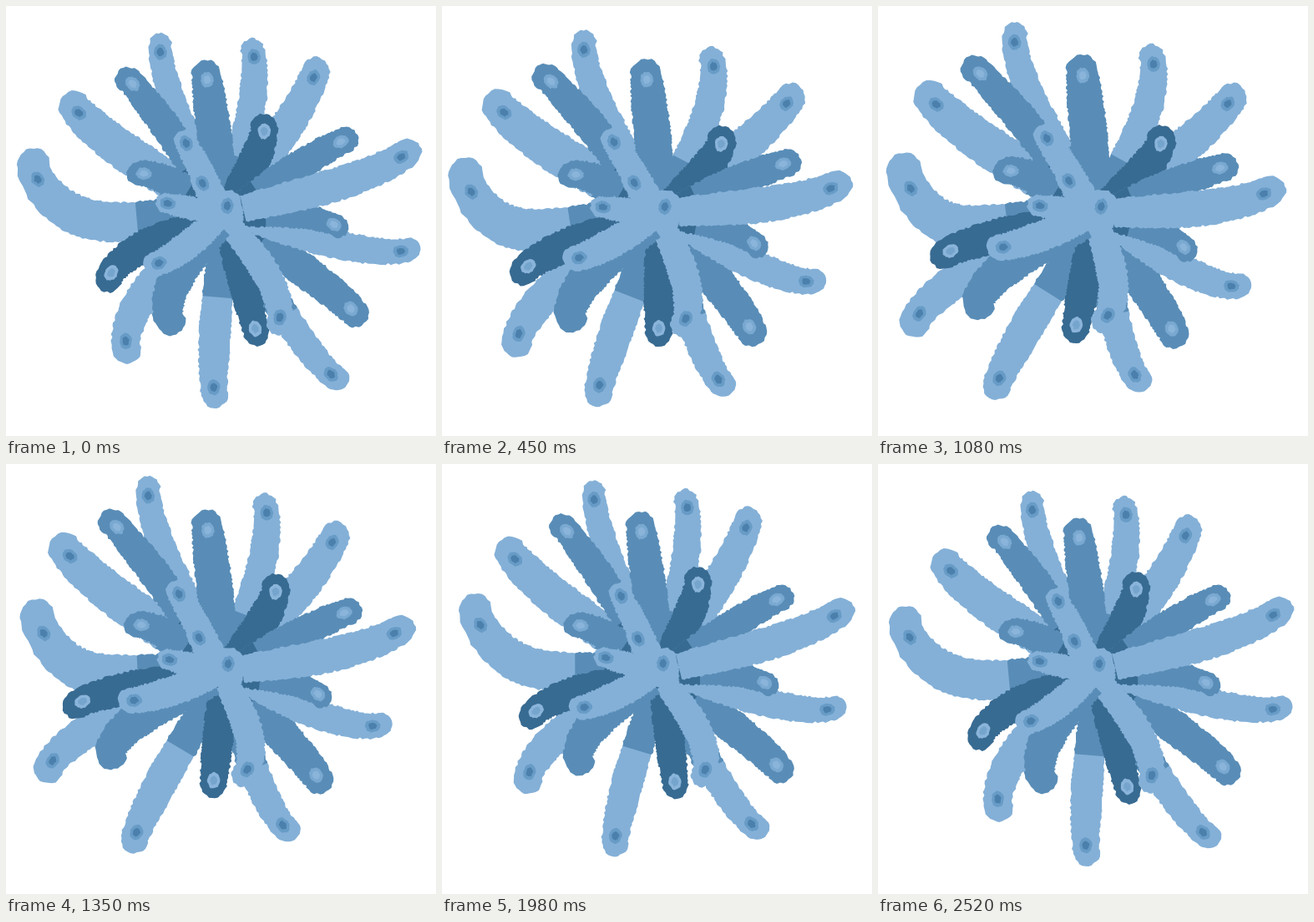
These frames come from a looping animation (515x515 px, 2550 ms). An HTML page with a canvas:

```html
<!DOCTYPE html>
<html lang="en">
<head>
<meta charset="utf-8">
<title>Anemone</title>
<style>
html, body { margin: 0; width: 100%; height: 100%; overflow: hidden; background: #fff; }
canvas { display: block; width: 515px; height: 515px; }
</style>
</head>
<body>
<canvas id="stage" width="515" height="515"></canvas>
<script>
const ctx = document.getElementById('stage').getContext('2d');
const LOOP = 2550, STEP = 30, CYCLE = 2520, SAMPLES = 70;
const CX = 262, CY = 250;
const LIGHT = { fill: '#84b0d7', shade: '#598db7', eye: '#689cc7', core: '#4b80ac' };
const MID = { fill: '#598db7', shade: '#386b92', eye: '#79a8d0', core: '#8ab4da' };
const DARK = { fill: '#386b92', shade: '#386b92', eye: '#8ab4da', core: '#75a4cc' };

// Smooth closed curve through evenly spaced keys; pos runs from 0 to 1.
function loop(keys, pos) {
  const n = keys.length, f = (pos - Math.floor(pos)) * n;
  const i = Math.floor(f), s = f - i;
  const [a, b, c, d] = [-1, 0, 1, 2].map(k => keys[(i + k + n) % n]);
  return b + .5 * s * (c - a + s * (2 * a - 5 * b + 4 * c - d + s * (3 * (b - c) + d - a)));
}

// Two poses, each a push by direction from the centre (every 30 degrees, from the right, clockwise).
const swing = {
  x: [-.2, -.37, -.42, -.48, -.49, -.27, -.02, -.08, -.17, .12, .37, .05],
  y: [.28, .22, .02, -.02, -.07, -.11, .12, 0, -.03, .02, .24, .26],
};
const lift = {
  x: [-.08, -.12, -.16, -.32, -.37, -.17, .05, 0, -.03, -.01, -.01, 0],
  y: [.02, .01, -.07, -.07, -.24, -.25, -.1, -.1, -.1, -.06, -.06, .02],
};
const swingAt = (x, time) => loop([0, .59, 1, .63 - .0005 * x, 0, -.04], time);
const liftAt = time => loop([0, -.04, .03, .67, 1, .5], time);

function warp(x, y, time) {
  const dx = x - CX, dy = y - CY, dist = Math.hypot(dx, dy);
  const dir = Math.atan2(dy, dx) / (2 * Math.PI);
  const p = swingAt(x, time) * dist, r = liftAt(time) * dist;
  return {
    x: x + p * loop(swing.x, dir) + r * loop(lift.x, dir),
    y: y + p * loop(swing.y, dir) + r * loop(lift.y, dir),
  };
}

// Fixed ragged edge, within 1.2 px.
function rough(i, seed) {
  const v = Math.sin(i * 12.9898 + seed * 78.233) * 43758.5453;
  return (v - Math.floor(v) - .5) * 2.4;
}

const polar = (c, angle, r) => [c.x + Math.cos(angle) * r, c.y + Math.sin(angle) * r];

function polygon(points, fill) {
  ctx.beginPath();
  points.forEach(p => ctx.lineTo(...p));
  ctx.fillStyle = fill;
  ctx.fill();
}

const limbs = [];
// A limb runs from its tip to near the centre, bowed sideways by bend.
function limb(tone, x, y, width, bend = 0, opts = {}) {
  const root = { x: CX + .1 * (x - CX), y: CY + .1 * (y - CY) };
  limbs.push({ tone, x, y, width, bend, root, shade: 1, ...opts });
}
const back = (tone, x, y, width, bend, shade = .72) => limb(tone, x, y, width, bend, { shade });

back(LIGHT, 185, 46, 16, 10);
back(LIGHT, 295, 53, 17, -10);
back(LIGHT, 371, 78, 20, -6);
back(LIGHT, 33, 190, 24, 46, .64);
back(LIGHT, 82, 121, 23, 8);
back(MID, 146, 88, 18, -4);
limb(MID, 240, 82, 21);
limb(DARK, 309, 145, 19, -6);
back(MID, 407, 160, 18, 3, .8);
back(LIGHT, 397, 447, 17, -9, .45);
back(MID, 418, 368, 20, 4, .8);
limb(LIGHT, 482, 292, 17, -10);
back(MID, 398, 265, 15, 8);
limb(LIGHT, 481, 175, 20, -9);
back(LIGHT, 250, 465, 19, -4, .6);
limb(DARK, 300, 392, 18);
limb(LIGHT, 326, 380, 17, 14);
limb(LIGHT, 145, 412, 20, -22);
limb(DARK, 123, 327, 19, -14);
limb(MID, 197, 377, 21, -17, { blind: true });
limb(LIGHT, 179, 309, 17, 4);
back(MID, 160, 201, 18, -7, .6);
limb(LIGHT, 214, 161, 15);
limb(LIGHT, 234, 211, 15);
limb(LIGHT, 191, 236, 14);
limb(LIGHT, 265, 238, 21, 0, { root: { x: 262, y: 268 } });

// Point on the resting spine: u is 0 at the tip and 1 at the root.
function spinePoint({ x, y, root, bend }, u) {
  const dx = root.x - x, dy = root.y - y, len = Math.hypot(dx, dy);
  const bow = bend / len * Math.sin(Math.PI * u ** .7);
  return [x + dx * u - dy * bow, y + dy * u + dx * bow];
}

function drawEye(at, angle, tone, seed) {
  const ring = size => Array.from({ length: 24 }, (_, k) => {
    const a = k * Math.PI / 12, w = size + rough(k, seed) * .07;
    const q = polar(at, angle, Math.cos(a) * 9.5 * w);
    return polar({ x: q[0], y: q[1] }, angle + Math.PI / 2, Math.sin(a) * 7.5 * w);
  });
  polygon(ring(1), tone.eye);
  polygon(ring(.55), tone.core);
}

function drawLimb(l, seed, time) {
  const pts = [], left = [], right = [], cap = [];
  const grow = l.width * (1 + .1 * swingAt(l.x, time));
  const radius = u => grow * (.7 + .3 * Math.sin(Math.PI * (.15 + .75 * u)));
  for (let i = 0; i <= SAMPLES; i++) pts.push(warp(...spinePoint(l, i / SAMPLES), time));

  const heading = i => {
    const a = pts[Math.max(0, i - 2)], b = pts[Math.min(SAMPLES, i + 2)];
    return Math.atan2(b.y - a.y, b.x - a.x);
  };
  pts.forEach((p, i) => {
    const a = heading(i), r = radius(i / SAMPLES);
    left.push(polar(p, a + Math.PI / 2, r + rough(i, seed)));
    right.push(polar(p, a - Math.PI / 2, r + rough(-i, seed)));
  });
  for (let k = 1; k < 14; k++) {
    cap.push(polar(pts[0], heading(0) + Math.PI * (.5 + k / 14), radius(0) + rough(k + 90, seed)));
  }
  polygon([...left.slice().reverse(), ...cap, ...right], l.tone.fill);

  const from = Math.round(l.shade * SAMPLES);
  if (from < SAMPLES) polygon([...left.slice(from).reverse(), ...right.slice(from)], l.tone.shade);
  if (!l.blind) drawEye(pts[3], heading(3), l.tone, seed);
}

function frame() {
  const time = Math.floor(performance.now() % LOOP / STEP) * STEP / CYCLE;
  ctx.fillStyle = '#fff';
  ctx.fillRect(0, 0, 515, 515);
  ctx.beginPath();
  ctx.arc(CX, CY - 8, 38, 0, 2 * Math.PI);
  ctx.fillStyle = MID.fill;
  ctx.fill();
  limbs.forEach((l, i) => drawLimb(l, i + 1, time));
  requestAnimationFrame(frame);
}
frame();
</script>
</body>
</html>
```
